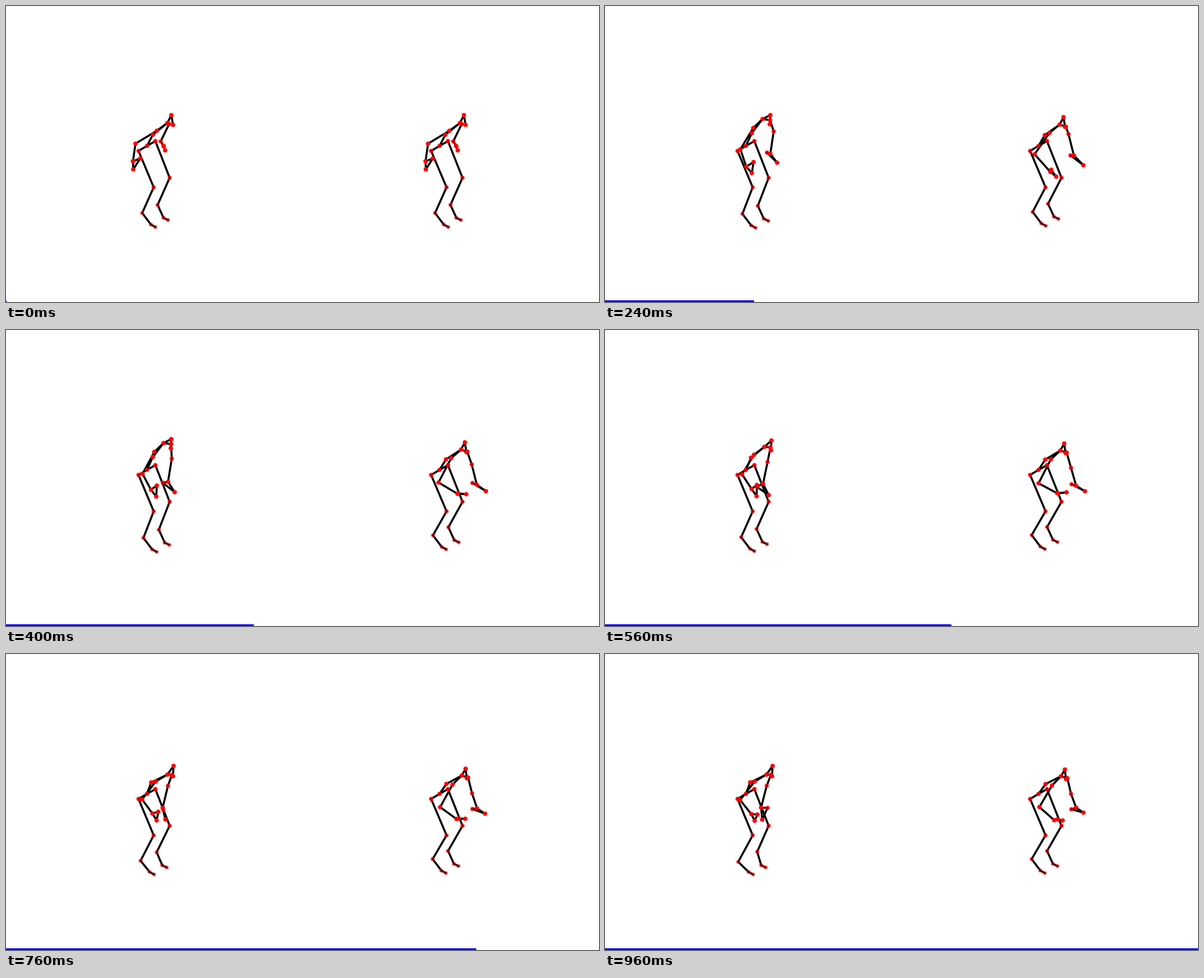
Recreate the animation shown at these times as a matplotlib script. Size 1058 px wide and 529 px high, loop 1 s.

```python
import numpy as np
import matplotlib.pyplot as plt
from matplotlib.animation import FuncAnimation
from matplotlib.collections import LineCollection
from matplotlib.patches import Rectangle

W, H, DPI = 1058, 529, 100
FRAMES, INTERVAL = 25, 40
T = np.arange(FRAMES)

# joint slots in a body
LEGS, TRUNK = slice(3, 11), slice(11, 17)
R_ANKLE, L_ANKLE, L_SHOULDER = 4, 8, 15
FEET = [4, 5, 6, 8, 9, 10]
L_ARM, R_ARM = slice(17, 21), slice(21, 25)
CHAINS = [(0, 1, 3, 4, 5, 6), (0, 2, 7, 8, 9, 10), (0, 11, 12, 13, 14),
          (12, 15, 17, 18, 19, 20, 18), (12, 16, 21, 22, 23, 24, 22)]
BONES = np.array([pair for c in CHAINS for pair in zip(c, c[1:])])

# starting pose around the pelvis, shared by both bodies
REST = np.array([
    (0, 0), (-15, 9), (15, -8.5),
    (12, 74), (-8.5, 120), (7, 140.5), (15, 145),             # right leg
    (40.5, 57), (19, 105.5), (29.5, 128.5), (37.5, 132.5),    # left leg
    (10.5, -20), (36.5, -41), (43.5, -55), (46.5, -37.5),     # spine to face
    (39.5, -39), (17.5, -27),                                 # shoulders
    (24.5, -8), (29.5, 0), (30, 1), (32.5, 8),                # left arm
    (-20.5, -4), (-25, 27.5), (-12, 22.5), (-24.5, 42)])      # right arm


def ramp(a, b):
    """Smooth 0 to 1 between two times, shaped to scale joint offsets."""
    u = np.clip((T - a) / (b - a), 0, 1)
    return (u * u * (3 - 2 * u))[:, None, None]


def swing(start, times, *poses):
    """Arm path through a few poses, easing without overshoot."""
    p = np.array([start, *poses], float)
    t = np.array([0, *times], float)
    slope = np.diff(p, axis=0) / np.diff(t)[:, None, None]
    a, b = slope[:-1], slope[1:]
    same = a * b > 0
    m = np.zeros_like(p)
    m[0] = slope[0]
    m[1:-1] = np.where(same, 2 * a * b / np.where(same, a + b, 1), 0)
    k = np.clip(np.searchsorted(t, T, side="right") - 1, 0, len(t) - 2)
    d = (t[k + 1] - t[k])[:, None, None]
    u = (T - t[k])[:, None, None] / d
    return ((1 + 2 * u) * (1 - u) ** 2 * p[k] + u * u * (3 - 2 * u) * p[k + 1]
            + d * u * (1 - u) * ((1 - u) * m[k] - u * m[k + 1]))


def left_body():
    pose = np.tile(REST, (FRAMES, 1, 1))
    down = ramp(10, 18)
    up = ramp(0, 6) * (1 - down)
    rise = [(0, -3), (-7, -7), (0, 0), (-4, -1), (3.5, -7), (-4.5, -5)]
    sink = [(-3, -0.5), (0, 6.5), (4, 5), (0, 6), (5, 5), (-2, 5)]
    pose[:, TRUNK] += up * np.array(rise) + down * np.array(sink)
    pose[:, FEET] += up * (2.2, 1.5) - down * (2.3, 1)
    pose[:, [R_ANKLE, L_ANKLE]] += ramp(17, 24) * [(-3, 2.5), (3.3, -1)]
    times = 6, 14, 24
    pose[:, L_ARM] = swing(
        REST[L_ARM], times,
        [(49.5, -26), (43.5, 14), (37.5, 12), (55.5, 30)],
        [(38.5, -14), (30.5, 25), (19, 30), (40.5, 45)],
        [(37, -14.5), (27, 24.5), (38.5, 25), (29, 46)])
    pose[:, R_ARM] = swing(
        REST[R_ARM], times,
        [(-10, 6), (0.5, 37), (13.5, 29), (10.5, 48.5)],
        [(-7, 8), (10, 34), (19.5, 27), (19, 47)],
        [(-10.5, 11), (9.5, 36), (20.5, 37), (15.5, 48)])
    return pose + (251.5, 250)


def right_body():
    pose = np.tile(REST, (FRAMES, 1, 1))
    sag = (1 - (1 - T / (FRAMES - 1)) ** 1.3)[:, None, None]
    drop = [(2, 2.5), (3.5, 9.5), (3.5, 11.5), (2.5, 11), (4, 9), (6.5, 12)]
    pose[:, TRUNK] += sag * np.array(drop)
    pose[:, [L_SHOULDER]] += ramp(0, 6) * (8, 2)
    pose[:, LEGS] += (0.5, 0)
    pose[:, FEET] -= np.sin(np.minimum(T / 15, 1) * np.pi / 2)[:, None, None] * (4.3, 3.5)
    times = 6, 12, 24
    pose[:, L_ARM] = swing(
        REST[L_ARM], times,
        [(53.5, -21), (63, 17), (57, 17), (80, 34.5)],
        [(58, -5), (67, 28.5), (59, 25), (83, 38.5)],
        [(58, 0), (67, 24.5), (58.5, 27.5), (80, 33.5)])
    pose[:, R_ARM] = swing(
        REST[R_ARM], times,
        [(-7, 15), (21, 46.5), (22.5, 42.5), (31.5, 55)],
        [(-0.5, 24), (34, 41.5), (35, 41.5), (50.5, 39.5)],
        [(1.5, 23.5), (28, 47), (33.5, 45.5), (43, 47.5)])
    return pose + (773.5, 250)


# lower joints lie deeper and fade, as do the far elbow and thumb
alpha = np.ones(len(REST))
alpha[:11] = 0.82 - 0.0033 * REST[:11, 1]
alpha[[17, 19]] = 0.72
COLORS = [(1, 0, 0, a) for a in alpha]

fig = plt.figure(figsize=(W / DPI, H / DPI), dpi=DPI, facecolor="white")
ax = fig.add_axes([0, 0, 1, 1])
ax.set_xlim(0, W)
ax.set_ylim(H, 0)
ax.axis("off")

actors = []
for path in (left_body(), right_body()):
    bones = LineCollection(path[0][BONES], colors="black", linewidths=2.6,
                           capstyle="projecting", zorder=2)
    ax.add_collection(bones)
    dots = ax.scatter(*path[0].T, s=20, c=COLORS, edgecolors=COLORS,
                      linewidths=1.2, zorder=3)
    actors.append((path, bones, dots))

bar = ax.add_patch(Rectangle((0, H - 3), 1, 3, color="blue", lw=0))


def draw(i):
    for path, bones, dots in actors:
        bones.set_segments(path[i][BONES])
        dots.set_offsets(path[i])
    bar.set_width(W * i / (FRAMES - 1) + 1)
    return []


anim = FuncAnimation(fig, draw, frames=FRAMES, interval=INTERVAL,
                     repeat=True, repeat_delay=0, blit=False)
plt.show()
```
